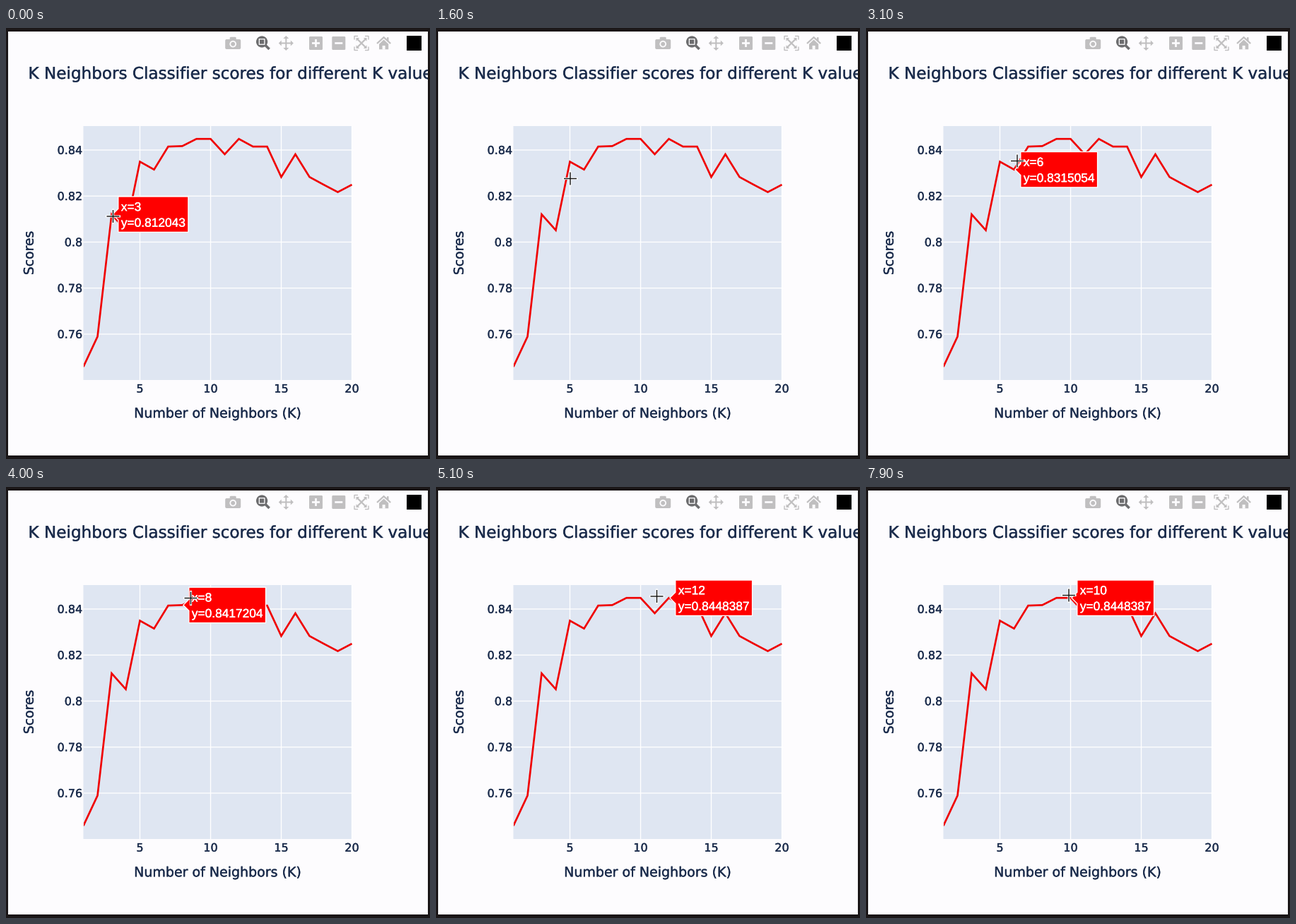
Recreate the animation shown at these times as a matplotlib script. Size 600 by 611 pixels, loop 8000 ms.

```python
import numpy as np
import matplotlib.pyplot as plt
from matplotlib.animation import FuncAnimation
from matplotlib.patches import Circle, FancyBboxPatch, Polygon, Rectangle
from matplotlib.patheffects import withStroke

W, H = 600, 611
FRAMES, STEP = 80, 100
SCALE = 4 / 3
PT = 0.72

PAGE, EDGE, PLOT = "#fdfcfe", "#1a1617", "#dfe6f2"
INK, LINE, TIP = "#1b2c4c", "#f00000", "#ff0000"
SOFT, ACTIVE = "#c0bfc0", "#6c6c6e"
LEFT, RIGHT, TOP, BOTTOM = 109.5, 489.5, 139, 499

# Ten-fold accuracy over 303 rows: three folds hold 31 rows, seven hold 30.
K = np.arange(1, 21)
errors = np.array([77, 73, 57, 59, 50, 51, 48, 48, 47, 47,
                   49, 47, 48, 48, 52, 49, 52, 53, 54, 53])
large = errors * 3 // 10
large[[2, 5, 7]] += [2, -1, 2]
SCORES = 1 - (large / 31 + (errors - large) / 30) / 10


def to_x(k):
    return LEFT + 20 * (k - 1)


def to_y(score):
    return 173 + (0.84 - score) * 3262


PX, PY = to_x(K), to_y(SCORES)

# pointer stops: time (ms), x, y
STOPS = np.array([
    (0, 151.5, 267), (1600, 190, 213.5), (2400, 193, 191), (3100, 214, 188.5),
    (4000, 261.5, 157.5), (4900, 312.5, 155), (5100, 312.5, 155),
    (6400, 333.5, 155.5), (7900, 287, 153.5)]).T

plt.rcParams["text.hinting"] = "none"
plt.rcParams["path.snap"] = False
plt.rcParams["font.family"] = "DejaVu Sans"

fig = plt.figure(figsize=(W / 100, H / 100), dpi=100, facecolor=EDGE)
ax = fig.add_axes([0, 0, 1, 1])
ax.set_xlim(0, W)
ax.set_ylim(H, 0)
ax.axis("off")


def rect(x0, y0, x1, y1, color, z=1, r=0):
    if r:
        patch = FancyBboxPatch((x0, y0), x1 - x0, y1 - y0, fc=color, lw=0, zorder=z,
                               boxstyle=f"round,pad=0,rounding_size={r}")
    else:
        patch = Rectangle((x0, y0), x1 - x0, y1 - y0, fc=color, lw=0, zorder=z)
    ax.add_patch(patch)


def stroke(xs, ys, color, width, z=3, cap="butt"):
    return ax.plot(xs, ys, color=color, lw=width * PT, zorder=z,
                   solid_capstyle=cap, solid_joinstyle="miter")[0]


def fill(points, color, z=3):
    ax.add_patch(Polygon(points, fc=color, lw=0, zorder=z))


def disc(x, y, r, color, z=4):
    ax.add_patch(Circle((x, y), r, fc=color, lw=0, zorder=z))


def label(x, y, text, px, color=INK, z=4, **kw):
    kw.setdefault("va", "baseline")
    thicken = [withStroke(linewidth=0.35 * PT, foreground=color)]
    return ax.text(x, y, text, fontsize=px * PT, color=color, zorder=z,
                   path_effects=thicken, **kw)


def camera(x, y):
    rect(x - 11, y - 5.5, x + 11, y + 8.5, SOFT, r=2)
    rect(x - 4.5, y - 8.7, x + 4.5, y, SOFT, r=1.5)
    disc(x, y + 1.2, 4.8, PAGE)
    disc(x, y + 1.2, 3, SOFT)


def magnifier(x, y):
    disc(x, y, 8.1, ACTIVE, z=3)
    stroke([x + 5, x + 10.5], [y + 5, y + 10.5], ACTIVE, 3.6)
    for half, color in ((4.4, PAGE), (3.1, ACTIVE)):
        rect(x - half, y - half, x + half, y + half, color, z=4)


def pan(x, y):
    for dx, dy in ((1, 0), (-1, 0), (0, 1), (0, -1)):
        stroke([x, x + 8 * dx], [y, y + 8 * dy], SOFT, 2)
        fill([(x + 10.5 * dx, y + 10.5 * dy),
              (x + 6.5 * dx + 4 * dy, y + 6.5 * dy + 4 * dx),
              (x + 6.5 * dx - 4 * dy, y + 6.5 * dy - 4 * dx)], SOFT)


def zoom(x, y, plus):
    rect(x - 9.5, y - 9.5, x + 9.5, y + 9.5, SOFT, r=1.5)
    stroke([x - 5.5, x + 5.5], [y, y], PAGE, 2.7, z=4)
    if plus:
        stroke([x, x], [y - 5.5, y + 5.5], PAGE, 2.7, z=4)


def autoscale(x, y):
    for sx in (-1, 1):
        for sy in (-1, 1):
            stroke([x + sx * 5, x + sx * 10, x + sx * 10],
                   [y + sy * 10, y + sy * 10, y + sy * 5], SOFT, 1.4)
            stroke([x, x + sx * 6], [y, y + sy * 6], SOFT, 2.2)
            fill([(x + sx * 7.5, y + sy * 7.5), (x + sx * 2.8, y + sy * 7.5),
                  (x + sx * 7.5, y + sy * 2.8)], SOFT)


def home(x, y):
    stroke([x - 9.6, x, x + 9.6], [y + 0.5, y - 8.3, y + 0.5], SOFT, 2.2)
    fill([(x, y - 5), (x + 6.6, y + 1.3), (x + 6.6, y + 8.8),
          (x - 6.6, y + 8.8), (x - 6.6, y + 1.3)], SOFT)
    rect(x - 2, y + 3.5, x + 2, y + 9, PAGE, z=4)
    rect(x + 4.4, y - 8.3, x + 6.9, y - 3, SOFT, z=3)


def draw_toolbar(y=21.5):
    camera(321.2, y)
    magnifier(362.1, y - 2)
    pan(396.3, y)
    zoom(438.5, y, True)
    zoom(470.8, y, False)
    autoscale(503, y)
    home(534.6, y)
    rect(567, y - 10.5, 588, y + 10.5, "#000000", z=3)


def draw_chart():
    rect(LEFT, TOP, RIGHT, BOTTOM, PLOT)
    for k in range(5, 21, 5):
        stroke([to_x(k)] * 2, [TOP, BOTTOM], "white", SCALE, z=2)
        label(to_x(k), 516.7, str(k), 16, ha="center")
    for tick in np.arange(76, 85, 2) / 100:
        y = to_y(tick)
        stroke([LEFT, RIGHT], [y, y], "white", SCALE, z=2)
        label(108.2, y + 5.8, f"{tick:g}", 16, ha="right")
    line = stroke(PX, PY, LINE, 2.67)
    line.set_clip_path(Rectangle((LEFT, TOP), RIGHT - LEFT, BOTTOM - TOP,
                                 transform=ax.transData))
    label(31.5, 72, "K Neighbors Classifier scores for different K values", 23.1)
    label(299.5, 552.3, "Number of Neighbors (K)", 19, ha="center")
    label(33.5, 319, "Scores", 18.8, ha="center", va="center", rotation=90)


rect(3, 5, 597, 606, PAGE, z=0)
rect(597, 0, W, H, EDGE, z=5)
draw_toolbar()
draw_chart()

tip = ax.add_patch(Polygon([(0, 0)], fc=TIP, ec="white", lw=SCALE * PT, zorder=6))
rows = [label(0, 0, "", 13 * SCALE, "white", z=7, family="Liberation Sans")
        for _ in range(2)]
halo = [stroke([], [], "white", 3.2, z=8, cap="projecting") for _ in range(2)]
cross = [stroke([], [], "#111111", 1.4, z=9) for _ in range(2)]


def pointer(t):
    times, xs, ys = STOPS
    return np.interp(t, times, xs), np.interp(t, times, ys)


def hovered(t):
    """Index of the nearest point within reach, or None."""
    x, y = pointer(t)
    dist = np.hypot(PX - x, PY - y)
    i = int(dist.argmin())
    return i if dist[i] < 20 else None


def place_tip(i):
    x, y = PX[i] + SCALE, PY[i]
    value = f"y={SCORES[i]:.7g}"
    # advance widths of y, =, . and the digits, in em
    em = 0.5 + 0.584 + 0.278 + 0.556 * (len(value) - 3)
    arrow, half = 6 * SCALE, 25.2
    left = x + arrow
    right = left + em * 13 * SCALE + arrow
    tip.set_xy([(x, y), (left, y + arrow), (left, y + half), (right, y + half),
                (right, y - half), (left, y - half), (left, y - arrow)])
    for row, text, dy in zip(rows, (f"x={K[i]}", value), (-5, 17.5)):
        row.set_text(text)
        row.set_position((x + 9 * SCALE, y + dy))


def update(n):
    t = n * STEP
    x, y = pointer(t)
    for across, down in (halo, cross):
        across.set_data([x - 9, x + 9], [y, y])
        down.set_data([x, x], [y - 9, y + 9])
    # the hover box trails the pointer by one step
    i = hovered(max(t - STEP, 0))
    for part in (tip, *rows):
        part.set_visible(i is not None)
    if i is not None:
        place_tip(i)
    return [tip, *rows, *halo, *cross]


anim = FuncAnimation(fig, update, frames=FRAMES, interval=STEP,
                     repeat=True, repeat_delay=0, blit=False)
plt.show()
```
